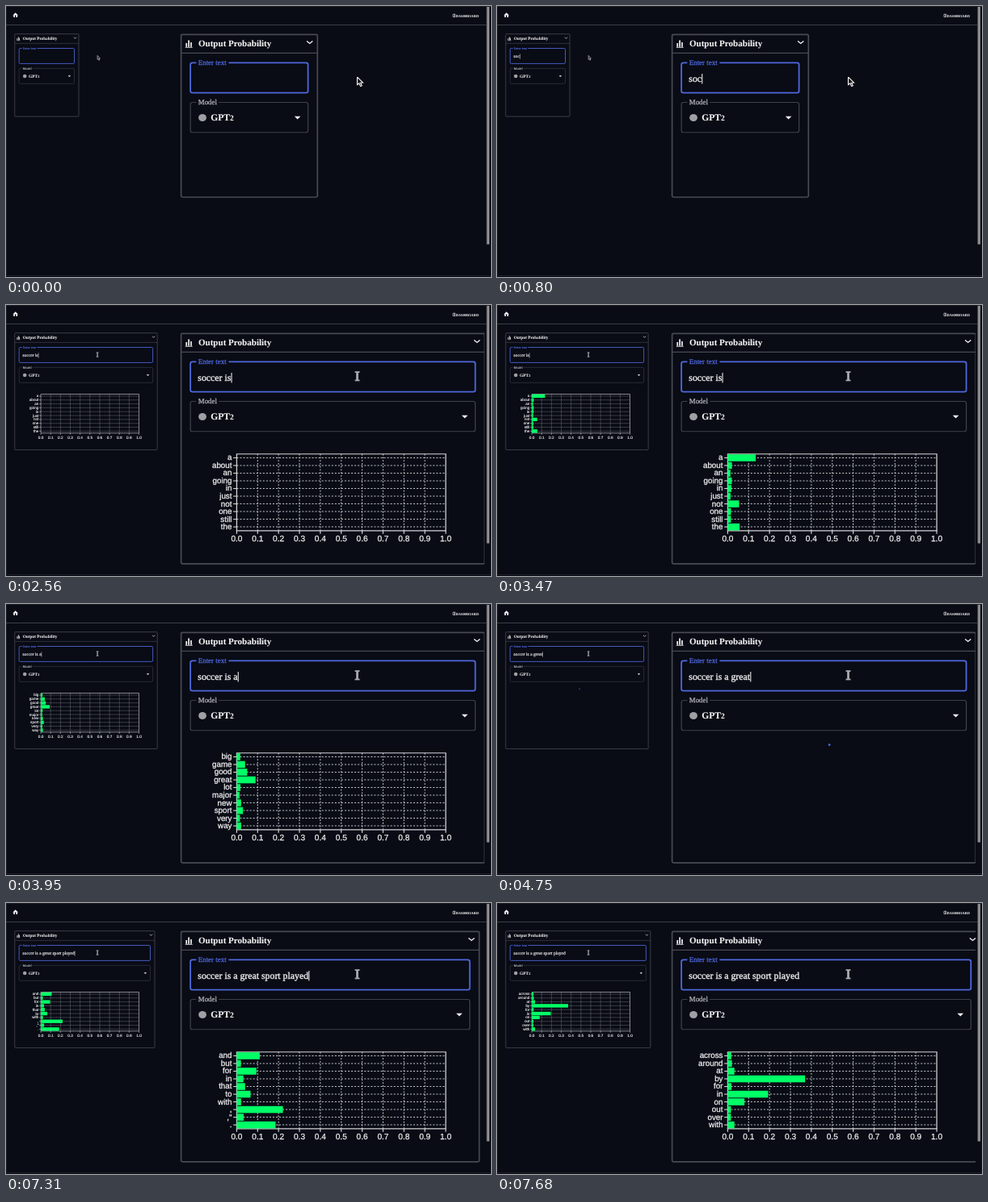
Animation of 600 by 336 pixels, one loop 8 s. Source, as an HTML page with a canvas:

```html
<!DOCTYPE html>
<html lang="en">
<head>
<meta charset="utf-8">
<title>Output Probability</title>
<style>
  html, body { margin: 0; width: 100%; height: 100%; overflow: hidden; background: #090b15; }
  canvas { display: block; width: 600px; height: 336px; }
</style>
</head>
<body>
<canvas id="stage"></canvas>
<script>
const LOOP = 8000, WAIT = 110, GROW = 50, BLINK = 500;
const BG = '#090b15', BLUE = '#4f68dc', GREEN = '#00ff66';
const WHITE = '#f2f2f2', GREY = '#a9abb0', EDGE = '#484a53';
const SERIF = '"Liberation Serif", "Times New Roman", serif';
const SANS = '"Liberation Sans", Arial, sans-serif';
const LENS = { x: 2.13, y: 1.97 };

const canvas = document.getElementById('stage');
const ctx = canvas.getContext('2d');
const dpr = window.devicePixelRatio || 1;
canvas.width = 600 * dpr;
canvas.height = 336 * dpr;

// Each burst is typed evenly from..to; a request at `load` brings the chart.
// Words carry a value only where their bar stands out.
const BURSTS = [
  { text: 'soc', from: 270, to: 750 },
  { text: 'cer', from: 850, to: 1050, load: 1080, words: `_ and is " ",":.03 '.:.038 ":.027 -:.062 .:.303 —` },
  { text: ' is', from: 1700, to: 2400, load: 2450, words: 'a:.134 about an going in just not:.054 one still the:.057' },
  { text: ' a', from: 3630, to: 3680, load: 3790, words: 'big game:.04 good:.05 great:.09 lot major new sport:.03 very way' },
  { text: ' great', from: 4210, to: 4590, load: 4750, words: 'game:.058 idea league match opportunity place:.045 sport:.088 team thing way:.179' },
  { text: ' sport', from: 5490, to: 5970, load: 6130, words: 'and:.11 but for:.094 in:.032 that:.04 to:.066 with ,:.221 ,":.033 .:.186' },
  { text: ' played', from: 6610, to: 7150, load: 7520, words: 'across around at:.032 by:.37 for in:.193 on:.08 out over with:.032' }
];

const clamp = v => Math.max(0, Math.min(1, v));
const smooth = v => clamp(v) ** 2 * (3 - 2 * clamp(v));

for (const b of BURSTS) {
  if (!b.load) continue;
  b.bars = b.words.split(' ').map((item, i) => {
    const [word, value] = item.split(':');
    return { word, value: +value || .017 + .004 * Math.sin(i * 2.3) };
  });
  // The card is as wide as its longest label asks for
  ctx.font = `47px ${SANS}`;
  b.right = 176.1 + .094 * Math.max(...b.bars.map(bar => ctx.measureText(bar.word).width));
}

let lens = false;

function label(str, x, y, size, { color = WHITE, weight = 400, family = SERIF, align = 'left', bold = .12 } = {}) {
  ctx.save();
  ctx.translate(x, y);
  if (lens) ctx.scale(1, LENS.x / LENS.y);   // keep letters in true proportion
  ctx.font = `${weight} ${size}px ${family}`;
  ctx.textAlign = align;
  ctx.fillStyle = ctx.strokeStyle = color;
  ctx.lineWidth = bold;
  ctx.fillText(str, 0, 0);
  ctx.strokeText(str, 0, 0);
  const { width } = ctx.measureText(str);
  ctx.restore();
  return width;
}

function box(x, y, w, h, color) {
  ctx.fillStyle = color;
  ctx.fillRect(x, y, w, h);
}

function path(points) {
  ctx.beginPath();
  points.forEach(([x, y]) => ctx.lineTo(x, y));
}

function line(points, color, width) {
  path(points);
  ctx.strokeStyle = color;
  ctx.lineWidth = width;
  ctx.stroke();
}

function shape(points, color) {
  path(points);
  ctx.fillStyle = color;
  ctx.fill();
}

function frame(x, y, w, h, r, color, width) {
  ctx.beginPath();
  ctx.roundRect(x, y, w, h, r);
  ctx.strokeStyle = color;
  ctx.lineWidth = width;
  ctx.stroke();
}

function field(y, right, name, notch, color, nameColor, width) {
  frame(16.2, y, right - 21.7, 18.9, 1.2, color, width);
  box(19.6, y - 1, notch, 2, BG);
  label(name, 20.7, y + 1.3, 4.2, { color: nameColor });
}

function drawChart(bars, grow) {
  const x0 = 43.1, x1 = 164.5, y0 = 110.5, y1 = 158.8;
  const row = (y1 - y0) / 10, col = (x1 - x0) / 10;
  const mid = i => y0 + row * (i + .5);
  const text = { family: SANS };

  ctx.setLineDash([.95, .95]);
  for (let i = 0; i < 10; i++) {
    line([[x0, mid(i)], [x1, mid(i)]], '#c4c6ca', .5);
    if (i) line([[x0 + col * i, y0], [x0 + col * i, y1]], '#c4c6ca', .5);
  }
  ctx.setLineDash([]);
  frame(x0, y0, x1 - x0, y1 - y0, 0, '#d4d5d8', .6);

  bars.forEach(({ word, value }, i) => {
    box(x0, mid(i) - row * .45, (x1 - x0) * value * grow, row * .9, GREEN);
    line([[x0 - 2, mid(i)], [x0, mid(i)]], '#d4d5d8', .55);
    if (word !== '_') label(word, x0 - 2.8, mid(i) + 1.5, 4.6, { ...text, align: 'right' });
  });
  for (let i = 0; i <= 10; i++) {
    const x = x0 + col * i;
    line([[x, y1], [x, y1 + 2]], '#d4d5d8', .55);
    label((i / 10).toFixed(1), x, 165.5, 4.75, { ...text, align: 'center' });
  }
}

function drawSpinner(age, cx) {
  const p = (age + 70) / 1400;
  const turn = (p * 2 - .5) * Math.PI;
  const sweep = (1 + 99 * smooth(p * 2)) / 126 * 2 * Math.PI;
  ctx.beginPath();
  ctx.arc(cx, 111.2, 6.4, turn, turn + sweep);
  ctx.strokeStyle = BLUE;
  ctx.lineWidth = 1.1;
  ctx.stroke();
}

function drawPointer(onField) {
  if (onField) {
    for (const y of [58.9, 64.2]) line([[111.7, y], [114.5, y]], GREY, .9);
    line([[113.1, 58.9], [113.1, 64.2]], GREY, 1.3);
    return;
  }
  const arrow = [[113.1, 61.4], [113.1, 66.3], [114.2, 65.4], [115, 67.3], [115.8, 66.9], [115, 65.1], [116.4, 65]];
  shape(arrow, '#15161c');
  line([...arrow, arrow[0]], WHITE, .55);
}

function drawCard(s) {
  const { right } = s;
  frame(10.8, 34.7, right - 10.8, s.bottom - 34.7, .8, EDGE, .8);
  line([[10.8, 46.4], [right, 46.4]], EDGE, .6);

  [2.4, 4.2, 2.9].forEach((h, i) => box(13.5 + i * 1.35, 42.5 - h, .8, h, WHITE));
  line([[13.2, 42.8], [17.4, 42.8]], WHITE, .4);
  label('Output Probability', 20.8, 42.1, 5.2, { weight: 700, bold: .04 });
  line([[right - 6.2, 38.8], [right - 4.5, 40.3], [right - 2.8, 38.8]], WHITE, .65);

  field(52.5, right, 'Enter text', 18.8, BLUE, BLUE, .85);
  const width = label(s.text, 20.5, 64.4, 5.55, { bold: .16 });
  if (s.caret) box(20.6 + width, 59.4, .5, 6.3, WHITE);

  field(77.4, right, 'Model', 13, '#3d3f49', '#b4b5ba', .6);
  ctx.beginPath();
  ctx.arc(23.2, 87, 2.3, 0, 7);
  ctx.fillStyle = '#9fa0a4';
  ctx.fill();
  const gpt = label('GPT', 28, 89, 5.45, { weight: 700, bold: .04 });
  label('2', 28 + gpt, 89, 4.5, { weight: 700, bold: .04 });
  const ax = right - 11.6;
  shape([[ax - 1.8, 86.2], [ax + 1.8, 86.2], [ax, 88.1]], WHITE);

  if (s.loading) drawSpinner(s.age, (10.8 + right) / 2 + .6);
  else if (s.bars) drawChart(s.bars, s.grow);
  drawPointer(right > 113);
}

function drawPage() {
  box(0, 0, 600, 336, '#202127');
  box(1, 1, 599, 333, BG);
  box(0, 335, 600, 1, BG);
  box(0, 23, 594, 1, '#3d3f47');
  box(594.6, 1, 3.4, 294.5, '#8b8b8d');

  shape([[8.4, 11.4], [11.7, 8.2], [15, 11.4]], WHITE);
  box(9.3, 11, 1.7, 3, WHITE);
  box(12.4, 11, 1.7, 3, WHITE);

  frame(552.9, 10.2, 3, 3.4, .2, WHITE, .6);
  box(554, 10.2, .6, 3.4, WHITE);
  label('DASHBOARD', 556.6, 13.7, 4.45, { weight: 700, bold: .04 });
}

function stateAt(t) {
  const s = { text: '', caret: false, right: 90, bottom: 137, loading: false };
  for (const b of BURSTS) {
    if (t < b.from) break;
    const step = (b.to - b.from) / (b.text.length - 1);
    const typed = Math.min(b.text.length, Math.floor((t - b.from) / step) + 1);
    s.text += b.text.slice(0, typed);
    s.caret = (t - b.from - step * (typed - 1)) % (2 * BLINK) < BLINK;
    if (!(t >= b.load)) continue;
    s.age = t - b.load;
    s.loading = s.age < WAIT;
    if (s.loading) continue;
    s.bars = b.bars;
    s.right = b.right;
    s.bottom = 179.6;
    s.grow = smooth((s.age - WAIT) / GROW);
  }
  return s;
}

function draw(t) {
  const s = stateAt(t);
  ctx.setTransform(dpr, 0, 0, dpr, 0, 0);
  ctx.textRendering = 'geometricPrecision';
  drawPage();
  drawCard(s);

  // Enlarged view of the same card
  ctx.save();
  ctx.beginPath();
  ctx.rect(210, 28, 382, 300);
  ctx.clip();
  ctx.translate(216, 35);
  ctx.scale(LENS.x, LENS.y);
  ctx.translate(-10.5, -34.5);
  lens = true;
  drawCard(s);
  lens = false;
  ctx.restore();
}

const begin = performance.now();
function tick() {
  draw((performance.now() - begin) % LOOP);
  requestAnimationFrame(tick);
}
tick();
</script>
</body>
</html>
```
